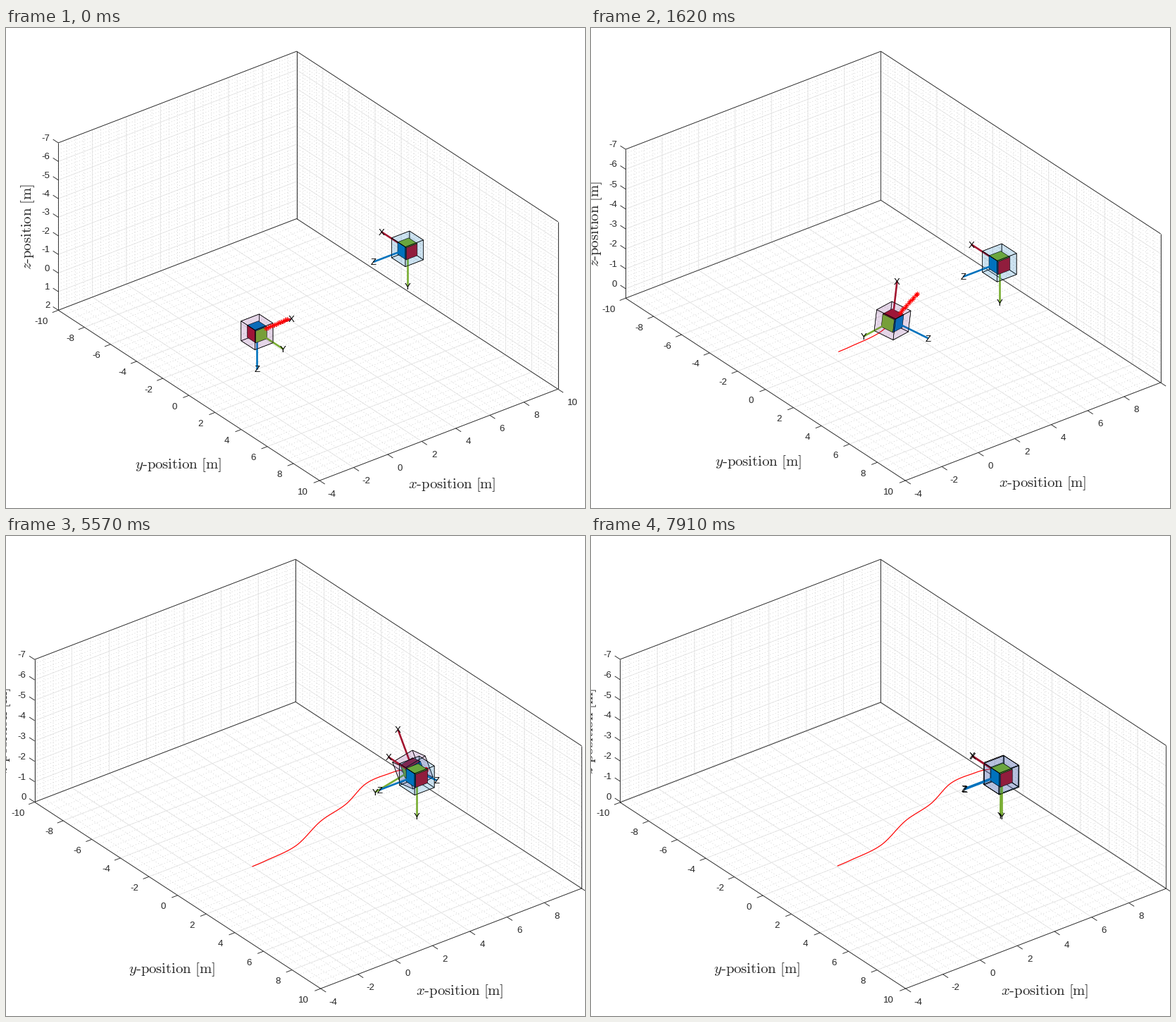
These frames come from a looping animation (822 px wide and 681 px high, 8000 ms). A matplotlib script:

```python
import numpy as np
import matplotlib.pyplot as plt
from matplotlib.animation import FuncAnimation
from matplotlib.collections import LineCollection, PolyCollection
from matplotlib.colors import to_rgba

W, H, DPI = 822, 681, 100
PX = 72 / DPI
plt.rcParams["font.family"] = "Liberation Sans"
plt.rcParams["mathtext.fontset"] = "cm"

# Orthographic view, rows: right, down, towards the viewer
C, S, E = np.cos(np.radians(37.5)), np.sin(np.radians(37.5)), np.sqrt(0.75)
VIEW = np.array([[C, S, 0], [-S / 2, C / 2, E], [-S * E, C * E, -0.5]])
CX, CY, TALL, Z_TOP = 428.4, 337.1, 609, -7
FLAT = 7 * S + 10 * C
S0 = TALL / (FLAT + E * 7)

INK = (0.15, 0.15, 0.15)
HUES = ("#a2142f", "#77ac30", "#0072bd")
PURPLE, BLUE = "#7e2f8e", "#0072bd"
OUTER, INNER, ARM = 0.53, 0.325, 2.0

# Flight path: time and place in the settled view
TRACK = np.array([
    (0, 349, 468.5), (0.6, 368.6, 460), (1.3, 411, 439), (2.02, 447, 403.5),
    (2.66, 482, 380), (3.3, 509, 352), (4.1, 545, 336), (5.57, 576.8, 331),
    (8.1, 582, 339)])

# Attitudes: level, nose up with a little yaw, and docked
YAW = np.radians(10)
UPRIGHT = VIEW @ np.array([[0, -np.cos(YAW), np.sin(YAW)],
                           [0, np.sin(YAW), np.cos(YAW)],
                           [-1, 0, 0]])
DOCK = np.column_stack([-VIEW[:, 1], VIEW[:, 2], -VIEW[:, 0]])
DOCK_UV = VIEW[:2] @ np.array([5.17, 0.867, -2])

FRAMES, INTERVAL, PACE = 80, 100, 0.1015


def settle(t, tau, power):
    """Share of a manoeuvre done after t seconds."""
    return 1 - np.exp(-(max(t, 0) / tau) ** power)


def turn(a, b, f):
    """Rotate from attitude a to b by the share f."""
    r = a.T @ b
    ang = np.arccos((np.trace(r) - 1) / 2)
    k = (r - r.T) / (2 * np.sin(ang))
    return a @ (np.eye(3) + np.sin(f * ang) * k
                + (1 - np.cos(f * ang)) * k @ k)


def attitude(t):
    if t < 4.6:
        return turn(VIEW, UPRIGHT, settle(t, 0.85, 1.6))
    return turn(UPRIGHT, DOCK, settle(t - 4.6, 1.83, 2.54))


def place(t):
    """Point of the flight path in view units (cubic Hermite)."""
    tk, pk = TRACK[:, 0], TRACK[:, 1:]
    t = np.atleast_1d(t)
    m = np.gradient(pk, tk, axis=0)
    k = np.clip(np.searchsorted(tk, t) - 1, 0, len(tk) - 2)
    h = (tk[k + 1] - tk[k])[:, None]
    f = (t - tk[k])[:, None] / h
    p = (pk[k] * (1 + 2 * f) * (1 - f) ** 2 + m[k] * h * f * (1 - f) ** 2
         + pk[k + 1] * f * f * (3 - 2 * f) + m[k + 1] * h * f * f * (f - 1))
    return (p - (CX, CY)) / S0 - (0, 3.5 * E)


class Stage:
    """Maps view units and world points to pixels for a given floor depth."""

    def __init__(self, floor):
        self.floor = floor
        self.scale = TALL / (FLAT + E * (floor - Z_TOP))
        self.mid = E * (floor + Z_TOP) / 2

    def px(self, uv):
        return (CX, CY) + self.scale * (np.asarray(uv) - (0, self.mid))

    def at(self, x, y, z):
        return self.px(VIEW[:2] @ np.array([x - 3, y, z]))


def lines(ax, segs, color, width, **kw):
    ax.add_collection(LineCollection(segs, colors=[color], zorder=2,
                                     linewidths=width * PX, **kw))


def text(ax, x, y, s, size=13.3, color=INK, va="center_baseline", **kw):
    kw.setdefault("ha", "center")
    ax.text(x, y, s, fontsize=size * PX, color=color, va=va, zorder=2, **kw)


def grid(st, xs, ys, zs):
    at, fl = st.at, st.floor
    segs = [[at(x, -10, Z_TOP), at(x, -10, fl), at(x, 10, fl)] for x in xs]
    segs += [[at(10, y, Z_TOP), at(10, y, fl), at(-4, y, fl)] for y in ys]
    segs += [[at(-4, -10, z), at(10, -10, z), at(10, 10, z)] for z in zs]
    return segs


def draw_axes(ax, st):
    at, fl = st.at, st.floor
    step = 2 if 7.95 < fl - Z_TOP < 8.99 else 1
    xs, ys = np.arange(-4, 11, 2), np.arange(-10, 11, 2)
    zs = np.arange(step - 8, fl + 1e-6, step)
    fine = np.arange(Z_TOP, fl + 1e-6, 0.5 if step == 2 else 0.2)
    lines(ax, grid(st, np.arange(-4, 10.1, 0.5), np.arange(-10, 10.1, 0.5),
                   fine), (0.8,) * 3, 0.8, linestyles=[(0, (1.2, 3.8))])
    lines(ax, grid(st, xs, ys, zs), (0.89,) * 3, 0.8)

    left, back, right = (-4, -10), (10, -10), (10, 10)
    box = [[at(*c, Z_TOP) for c in (left, back, right)],
           [at(*c, fl) for c in (left, back, right, (-4, 10), left)]]
    box += [[at(*c, Z_TOP), at(*c, fl)] for c in (left, back, right)]
    along_x = np.array([0.934, -0.358])
    along_y = np.array([0.838, 0.546])
    ticks = []
    for x in xs:
        p = at(x, 10, fl)
        ticks.append([p, p + 9 * along_y])
        text(ax, p[0] + (21 if x == 10 else 17.5), p[1] + 18, str(x))
    for y in ys:
        p = at(-4, y, fl)
        ticks.append([p, p - 9 * along_x])
        text(ax, p[0] - (24 if abs(y) == 10 else 20.3), p[1] + 15, str(y))
    for z in zs:
        p = at(-4, -10, z)
        ticks.append([p, p - 9 * along_y])
        text(ax, p[0] - 12, p[1] - 7.5, str(int(z)), ha="right")
    lines(ax, box + ticks, INK, 0.9)

    k = (st.scale - 30.47) / 2.89
    title = r"$%s\text{-position}\ \text{[m]}$"
    text(ax, 632.5 + 11 * k, 647.5 - 2 * k, title % "x", 20.7, va="center")
    text(ax, 243.5 - 9 * k, 619.5 - 5 * k, title % "y", 20.7, va="center")
    p = at(-4, -10, (fl + Z_TOP) / 2)
    text(ax, p[0] - 43, p[1], title % "z", 20.7, va="center", rotation=90)


def faces(att, half, front):
    """Cube faces turned to, or away from, the viewer."""
    ring = half * np.array([(-1, -1), (1, -1), (1, 1), (-1, 1)])
    signs = [1 if (att[2, k] > 0) == front else -1 for k in range(3)]
    return [np.insert(ring, k, s * half, axis=1) @ att[:2].T
            for k, s in enumerate(signs)]


def draw_craft(ax, st, uv, att, tint):
    def polys(half, front, colors, alpha):
        ax.add_collection(PolyCollection(
            [st.px(uv + f) for f in faces(att, half, front)],
            facecolors=[to_rgba(c, alpha) for c in colors],
            edgecolors="black", linewidths=0.6 * PX, zorder=2))

    def arms(front):
        for k in range(3):
            if (att[2, k] > 0) == front:
                d = att[:2, k]
                lines(ax, [st.px([uv + INNER * d, uv + ARM * d])],
                      HUES[k], 2.6)

    polys(OUTER, False, [tint] * 3, 0.1)
    arms(False)
    polys(INNER, True, HUES, 1)
    arms(True)
    polys(OUTER, True, [tint] * 3, 0.1)
    for k, name in enumerate("XYZ"):
        text(ax, *st.px(uv + ARM * att[:2, k]), name, color="black")


def draw_ahead(ax, st, uv, t):
    """Predicted path: a row of asterisks along the velocity."""
    vel = (place(t + 0.1) - place(t))[0] / 0.1
    speed = np.hypot(*vel)
    reach = min(1.6, 1.5 * speed)
    if reach > 0.4:
        f = np.linspace(0.3, 1, 11)[:, None]
        ax.plot(*st.px(uv + f * reach * vel / speed).T, ls="none",
                marker=(8, 2, 0), ms=7 * PX, mew=0.5 * PX, color="red",
                zorder=2)


def draw(i):
    t = i * PACE
    att = attitude(t)
    uv = place(t)[0]
    down = VIEW[:, 2] @ att
    depth = -1.96 * settle(t, 3.2, 4)
    lowest = max(ARM * down.max(), OUTER * np.abs(down).sum())
    st = Stage(max(0, depth + lowest))

    ax.clear()
    ax.axis("off")
    ax.set_xlim(-0.5, W - 0.5)
    ax.set_ylim(H - 0.5, -0.5)
    draw_axes(ax, st)
    trail = st.px(place(np.linspace(0, t, int(40 * t) + 2)))
    lines(ax, [trail], "red", 1.2)
    draw_craft(ax, st, uv, att, PURPLE)
    draw_ahead(ax, st, uv, t)
    draw_craft(ax, st, DOCK_UV, DOCK, BLUE)
    return []


fig = plt.figure(figsize=(W / DPI, H / DPI), dpi=DPI, facecolor="white")
ax = fig.add_axes([0, 0, 1, 1])
anim = FuncAnimation(fig, draw, frames=FRAMES, interval=INTERVAL,
                     init_func=lambda: draw(0), repeat=True, repeat_delay=0)
plt.show()
```
